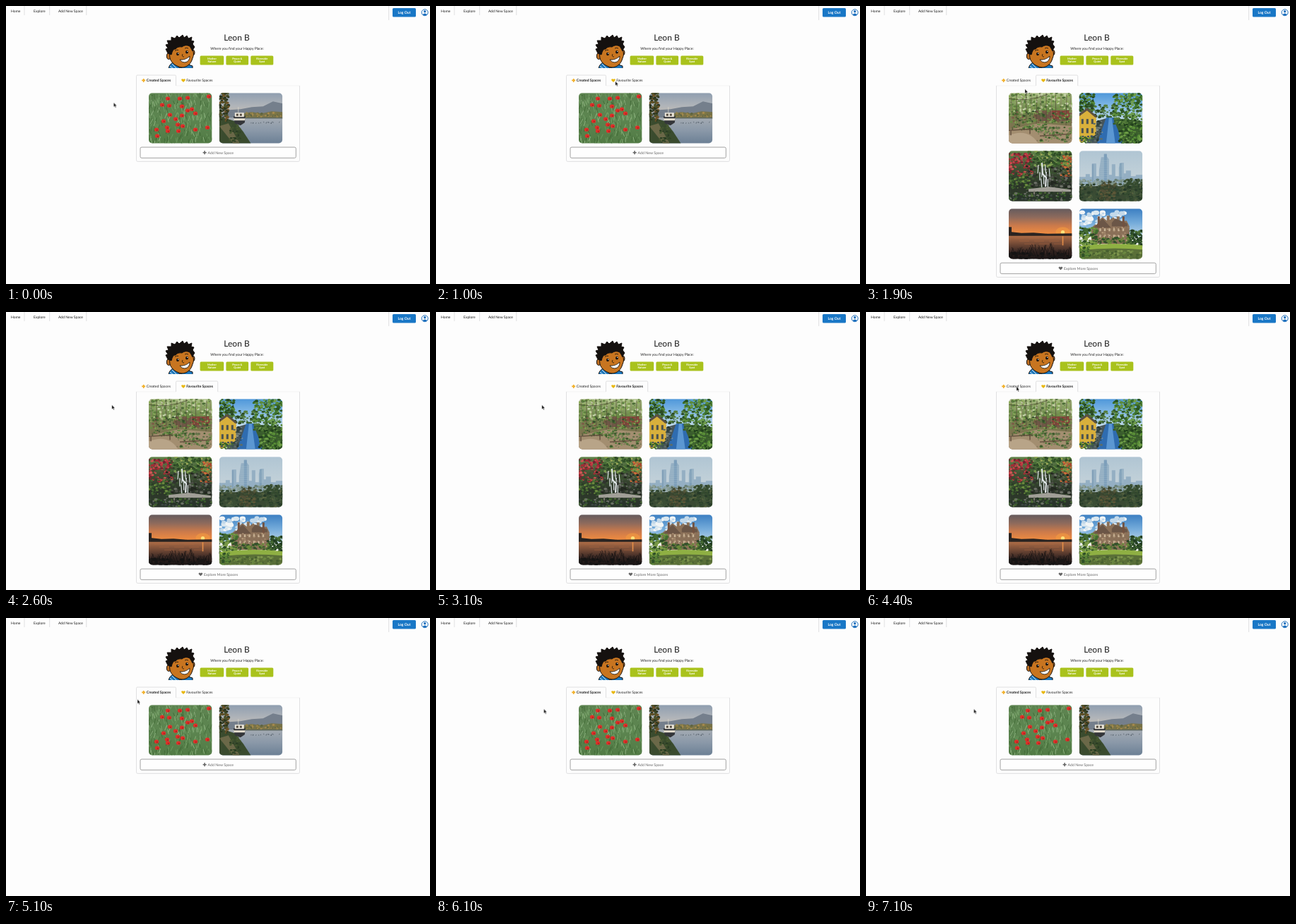
An HTML page for the animation above (7.2 s loop, 600 by 394 pixels).

```html
<!DOCTYPE html>
<html lang="en">
<head>
<meta charset="utf-8">
<title>Happy Place profile</title>
<style>
html, body { margin: 0; width: 100%; height: 100%; overflow: hidden; background: #fdfdfd; }
svg { display: block; width: 100%; height: 100%; }
text { font: 5.05px Lato, sans-serif; fill: #1c1c1c; text-rendering: geometricPrecision; }
.bold { font-weight: 700; }
.mid { text-anchor: middle; }
.white { fill: #fff; }
.name { font-size: 12px; }
.tag { font-size: 3.9px; }
.wide { font-size: 5.25px; fill: #666; }
.rule { fill: none; stroke: #d9d9da; stroke-width: .8; }
.button { fill: #fefefe; stroke: #999; stroke-width: .9; }
</style>
</head>
<body>
<svg viewBox="0 0 600 394">
  <defs>
    <path id="plus" d="M-.8-2.5H.8V-.8H2.5V.8H.8V2.5H-.8V.8H-2.5V-.8H-.8Z"/>
    <path id="heart" d="M0 2.5L-2.5 0C-3.6-1.5-1.6-3.4 0-1.6C1.6-3.4 3.6-1.5 2.5 0Z"/>
    <clipPath id="frame"><rect width="89.3" height="71.3" rx="5"/></clipPath>
    <clipPath id="portrait"><rect x="222" y="38" width="50" height="50"/></clipPath>
  </defs>

  <path class="rule" d="M26 0V13M61.7 0V13M113.8 0V13M541.7 0V20"/>
  <text x="7" y="8.5">Home</text>
  <text x="39" y="8.5">Explore</text>
  <text x="74" y="8.5">Add New Space</text>
  <rect x="547" y="3" width="33" height="12.5" rx="1.5" fill="#1977c6"/>
  <text class="bold mid white" x="563.5" y="11">Log Out</text>
  <g fill="none" stroke="#1f70bd">
    <circle cx="592.7" cy="9.2" r="4.5"/>
    <circle cx="592.7" cy="7.8" r="1.7" fill="#1f70bd" stroke="none"/>
    <path d="M589.4 12.3Q592.7 8.7 596 12.3Q592.7 15 589.4 12.3Z" fill="#1f70bd" stroke="none"/>
  </g>

  <g clip-path="url(#portrait)" stroke="#15110f" stroke-width="1" stroke-linejoin="round">
    <path d="M230 89Q231 82 237 80L246 88 258 83 264 85V89Z" fill="#1e78bd"/>
    <path d="M232 85l5 4M235 82l6 6" stroke="#d5e7f2"/>
    <ellipse cx="230.3" cy="71" rx="2.9" ry="4.4" fill="#c06f20"/>
    <ellipse cx="265" cy="66" rx="2" ry="3.6" fill="#c06f20"/>
    <path d="M231 65C234 56 240 57 246 54C252 51 257 53 260 55C265 61 267 68 264 74C262 82 256 87 249 87C241 86 234 81 232 74Z" fill="#c87520"/>
    <path d="M229 67L226 61 229 60 226 55 230 54 228 49 234 49 234 44 239 46 242 42 245 45 250 41 252 45 256 42 258 46 263 44 262 49 266 50 264 54 267 58 265 61 264 64Q262 60 260 57Q254 54 249 58Q243 57 240 61Q236 60 234 69Z" fill="#15110f"/>
    <path d="M246 76Q254 77 260 71Q260 79 253 80Q248 80 246 76Z" fill="#fff" stroke-width=".8"/>
    <g fill="#15110f" stroke="none">
      <ellipse cx="243" cy="68" rx="1.9" ry="2.3"/>
      <ellipse cx="256" cy="65.2" rx="1.9" ry="2.3"/>
    </g>
    <g fill="#fff" stroke="none">
      <circle cx="243.7" cy="67.2" r=".7"/>
      <circle cx="256.7" cy="64.4" r=".7"/>
    </g>
    <path d="M239 63.5Q241 61.5 244 62.5M253 60Q255 58.5 258 60M250 68Q248 72 252 72" fill="none" stroke-width=".8"/>
  </g>

  <text class="name mid" x="326.5" y="49">Leon B</text>
  <text class="mid" x="327" y="62">Where you find your Happy Place:</text>
  <g id="tags"></g>
  <g id="created"></g>
  <g id="favourite"></g>
  <path id="cursor" d="M0-.3V5.7L1.4 4.6 2.4 6.8 3.4 6.4 2.4 4.3H4.2Z" fill="#111" stroke="#fff" stroke-width=".3"/>
</svg>
<script>
const LOOP = 7200, STEP = 100;
const OPEN_FAVOURITES = 1300, OPEN_CREATED = 4600;
const el = id => document.getElementById(id);

let seed = 41;
const rnd = () => (seed = seed * 16807 % 2147483647) / 2147483647;
const pick = list => list[Math.floor(rnd() * list.length)];
const repeat = (n, fn) => Array.from({ length: n }, fn).join('');

// Drawing helpers; colour lists are space separated.
const box = (x, y, w, h, fill) => `<rect x="${x}" y="${y}" width="${w}" height="${h}" fill="${fill}"/>`;
const shape = (d, fill) => `<path d="${d}" fill="${fill}"/>`;
const line = (d, stroke, width = 1) => `<path d="${d}" fill="none" stroke="${stroke}" stroke-width="${width}"/>`;
const dot = (x, y, r, fill, squash = 1) =>
  `<ellipse cx="${x.toFixed(1)}" cy="${y.toFixed(1)}" rx="${r.toFixed(1)}" ry="${(r * squash).toFixed(1)}" fill="${fill}"/>`;
const leaves = (n, x, y, w, h, r, colours) => repeat(n, () =>
  dot(x + rnd() * w, y + rnd() * h, r * (.5 + rnd()), pick(colours.split(' ')), .75));
const blades = (n, x, y, w, h, len, colours) => repeat(n, () => {
  const lean = (rnd() - .5) * len;
  return line(`M${(x + rnd() * w).toFixed(1)} ${(y + rnd() * h).toFixed(1)}l${lean.toFixed(1)} ${-len}`,
    pick(colours.split(' ')), .7);
});
let fades = 0;
const fade = (y, h, colours) => {
  const id = 'fade' + fades++, list = colours.split(' ');
  const stops = list.map((c, i) => `<stop offset="${i / (list.length - 1)}" stop-color="${c}"/>`).join('');
  return `<linearGradient id="${id}" x2="0" y2="1">${stops}</linearGradient>` + box(0, y, 90, h, `url(#${id})`);
};

const poppies = () => {
  const spots = [[27, 8], [44, 8], [55, 7], [85, 5], [19, 17], [29, 18], [47, 19], [66, 29], [30, 31],
    [47, 32], [55, 25], [61, 23], [21, 40], [41, 45], [48, 47], [26, 49], [11, 52], [27, 54], [42, 54],
    [66, 52], [83, 49], [12, 61], [38, 37]];
  return fade(0, 72, '#5d8350 #5c8550 #527b45') +
    blades(260, 0, 4, 90, 74, 7, '#8db47c #426b38 #6f9c60 #a4c396 #39622f #78a56c') +
    spots.map(([x, y]) => dot(x, y, 3.1, '#de3029', .85) + dot(x + .8, y + .7, 1.1, '#b3211f')).join('');
};

const riverBoat = () => fade(0, 36, '#8f9eb0 #b0b4b9 #cdc2b1') +
  shape('M0 30L14 24 30 23 46 20 62 19 76 12 90 15V36H0Z', '#757f8c') +
  shape('M30 30L45 27 60 29 74 26 90 27V37H30Z', '#77724a') +
  leaves(60, 36, 28, 54, 6, 1.2, '#94834a #5f6440 #a88a4d #74703f') +
  fade(35, 37, '#a4abb3 #8a98a8 #6b7f94') +
  box(34, 35, 56, 1.2, '#525a4b') +
  shape('M0 33L22 40 34 55 45 72H0Z', '#3a4b2e') +
  shape('M0 47L13 43 29 72H20Z', '#6b6848') +
  leaves(110, -1, 0, 14, 40, 1.7, '#30391f #4c5129 #6d5327 #293420') +
  leaves(60, 15, 45, 14, 26, 1.3, '#2a3d23 #46582f #374a29') +
  shape('M20 33L37 33 36 42 30 46 22 43Z', '#34363a') +
  box(22, 28, 13, 6, '#ece7db') + box(24, 29.5, 3, 3, '#544b40') + box(29, 29.5, 3, 3, '#544b40') +
  shape('M20 36L37 36 36 39 21 39Z', '#e5dfd0') + line('M27 28V20', '#ded8ca', .7) +
  blades(16, 40, 42, 45, 2, 1.5, '#45515b');

const woodland = () => fade(0, 72, '#a9bd83 #6c8749 #7d7350 #927c5e') +
  leaves(260, 0, 0, 90, 28, 1.6, '#8fae5d #bdcf98 #5f8340 #7b994d #4a6936 #c9d5ae') +
  box(38, 25, 52, 15, '#6e5746') + box(60, 25, 26, 12, '#86443a') +
  leaves(150, 0, 26, 90, 16, 1.5, '#44682f #668b40 #344f2b #82a653 #7a5b45') +
  repeat(13, (_, i) => line(`M${4 + i * 7} ${40 + i % 3 * 3}l${i % 3 - 1} -43`, i % 2 ? '#544a38' : '#867d62', .7)) +
  shape('M0 52L42 43 90 47V72H0Z', '#a38e70') +
  shape('M0 60Q28 49 42 72H0Z', '#b8a488') +
  leaves(100, 38, 47, 52, 22, 1.5, '#567a3e #70944a #3d5a2c #8a7d60 #65704a') +
  leaves(50, 5, 44, 50, 9, 1.4, '#4d7037 #6d8f48 #384f2b') +
  line('M0 53L34 51M3 53V60M30 51V58M44 61L88 58', '#65523f', 1.5) +
  line('M0 8Q28 13 55 2', '#39352a', .6);

const townCanal = () => fade(0, 40, '#4e97da #86bbe6 #c3dbe9') +
  leaves(240, 48, 1, 44, 38, 1.8, '#396f2b #5b8b3b #28521f #6f9d4b #34592a') +
  leaves(110, -1, 0, 22, 27, 1.7, '#315d27 #568639 #23441e') +
  leaves(70, 14, 17, 34, 18, 1.7, '#3a6030 #547c3d #2a4724') +
  shape('M0 30L11 23 24 33V64L0 72Z', '#d8b03c') +
  shape('M0 29L11 21 25 33 23 35 11 25 0 33Z', '#5a5143') +
  repeat(6, (_, i) => box(3 + i % 3 * 7, i < 3 ? 37 : 50, 3, 7, '#4a5150')) +
  shape('M24 40L38 36 28 72H8L24 58Z', '#47555a') +
  shape('M38 35H49L64 72H25Z', '#2f6cb0') +
  shape('M42 35H46L51 72H38Z', '#5b97d2') +
  shape('M48 36L90 40V72H63Z', '#3a5d2d') +
  leaves(190, 57, 38, 35, 34, 1.6, '#2a4d20 #598f37 #6f9f47 #1f3c1b #41672e') +
  leaves(50, 49, 34, 20, 10, 1.4, '#365d2b #24461f #557c3a') +
  leaves(35, 20, 40, 13, 28, 1.5, '#34453f #5d6d68 #27362f #85908a') +
  leaves(40, 0, 61, 20, 10, 1.4, '#325e29 #638c3d #41515d');

const waterfall = () => fade(0, 72, '#61844a #3f5234 #2b3429 #303f2b') +
  leaves(200, 28, 0, 62, 22, 1.7, '#436b32 #769a4d #315028 #a3ae5a #2a4224') +
  leaves(170, -1, 4, 34, 31, 1.5, '#a72a35 #c03c45 #6e2530 #cc5552 #3c4a2c') +
  leaves(60, 74, 7, 16, 30, 1.5, '#cc6b3b #a94c31 #7a8b3d') +
  leaves(170, 25, 22, 65, 32, 1.7, '#30332f #4b4e46 #6b6f66 #22271f #3b5430') +
  repeat(9, (_, i) => line(`M${42 + i * 1.9} ${20 + i * 7 % 5 * 5}l${i % 3 - 1} 12`, '#d5dde0', 1.2)) +
  line('M47 17L48 33 53 38 52 51', '#e3e9eb', 2) +
  leaves(90, 0, 32, 32, 22, 1.7, '#466932 #6d8d3f #263f22 #35512b') +
  shape('M28 54L57 51 88 55V58H28Z', '#a19f97') + line('M36 57V63M76 57V63', '#77756c', 2) +
  box(0, 62, 90, 10, '#29342a') +
  leaves(110, 0, 59, 90, 12, 1.5, '#375a2b #55733a #233522 #3c4840 #6a6f66');

const skyline = () => fade(0, 72, '#b0c5d3 #bccdd7 #c9d4d9 #a5b5b8') +
  shape('M0 43V37H9V33H15V37H18V18H24V36H28V28L31 9H35V4H39V8L42 12V34H46V19H51V36H56V24L58 17 63 17V32H66V28H73V36H80V34H90V49H0Z', '#94afc3') +
  box(35, 5, 4, 39, '#7d9fba') + box(57, 18, 3, 26, '#7d9eb6') + box(18, 19, 2, 25, '#809fb7') +
  repeat(9, (_, i) => line(`M29 ${14 + i * 3}H42M56 ${20 + i * 2}H63`, '#a9c1d0', .4)) +
  leaves(110, 0, 41, 90, 7, 1.8, '#768c84 #83978c #677f76 #8d9f97') +
  box(0, 50, 90, 22, '#3a4a33') +
  leaves(220, -1, 47, 92, 25, 1.9, '#2f4430 #465a3d #273a28 #59633f #3a4d34') +
  leaves(90, 30, 43, 22, 27, 1.7, '#514f37 #3e4630 #5c5738 #39432c') +
  leaves(120, 64, 40, 26, 30, 1.8, '#263a29 #344a2f #415436');

const sunset = () => fade(0, 36, '#655b5d #8d6a5c #cb7a4b #f08c40') +
  dot(76.5, 33, 10, '#f8a13f77', .7) + dot(76.5, 33.5, 2.7, '#ffe27a') +
  fade(36, 36, '#b9744a #7d5039 #3d2a25 #151213') +
  shape('M0 36V26H4V33L18 34.5 35 34 55 35.5 90 35V38.5H0Z', '#292321') +
  line('M76.5 39V52', '#e58f49', 1.6) +
  repeat(9, (_, i) => line(`M${8 + i * 7} ${42 + i % 3 * 4}h14`, '#a8653f', .5)) +
  blades(110, 0, 62, 90, 12, 8, '#171414 #211a18') +
  blades(10, 38, 66, 40, 6, 18, '#171414') +
  leaves(70, 0, 63, 90, 9, 2, '#141313 #1a1716');

const manor = () => fade(0, 40, '#3c7fc2 #74abda #bed7e8') +
  leaves(60, 2, 4, 62, 18, 3, '#f2f5f6 #dae7ef #c3d9ea') +
  shape('M17 50V27L23 22 27 27V17L33 12 39 17V10H43V16L48 12 53 17V11H57V18L67 17 71 25V50Z', '#8a7058') +
  shape('M20 27L33 14 45 27ZM46 20L51 14 68 21V25H46Z', '#6b5647') +
  box(26, 11, 3, 16, '#725240') + box(61, 11, 3, 15, '#725240') +
  repeat(14, (_, i) => box(22 + i % 7 * 6.5, 28 + Math.floor(i / 7) * 9, 2.4, 4, '#c9b497')) +
  leaves(60, 18, 26, 52, 20, 1, '#a08468 #6b5643 #b59a7b') +
  leaves(150, -1, 27, 26, 27, 1.8, '#426a30 #658c3c #2c4c26 #7c9a48') +
  leaves(130, 68, 31, 22, 23, 1.8, '#2d4e28 #496d35 #223d22') +
  leaves(75, 22, 41, 50, 10, 1.5, '#3f622d #68883a #31502a') +
  shape('M0 53Q45 47 90 52V60H0Z', '#8fb043') +
  shape('M0 59Q46 54 90 58V72H0Z', '#5b7038') +
  leaves(120, 0, 60, 90, 11, 1.6, '#6c8841 #465e2f #7d944c #566d37') +
  leaves(50, 0, 54, 15, 17, 1.6, '#2f5127 #5b8338');

const gallery = photos => photos.map((photo, i) =>
  `<g transform="translate(${i % 2 ? 301.8 : 202} ${123.2 + Math.floor(i / 2) * 82})" clip-path="url(#frame)">${photo()}</g>`).join('');
const icon = (id, x, y, fill) => `<use href="#${id}" x="${x}" y="${y}" fill="${fill}"/>`;

// One tab panel: outline with the open tab, labels, photos and the bottom button.
const panel = ({ from, to, bottom, photos, action, mark, textX }) => {
  const open = from < 200;
  return `<path class="rule" d="M184.5 113V${bottom - 2}q0 2 2 2H413.5q2 0 2-2V113"/>` +
    `<path class="rule" stroke-opacity=".35" d="M184.5 113H${from}M${to} 113H415.5"/>` +
    `<path class="rule" d="M${from} 113V99.5q0-1.5 1.5-1.5H${to - 1.5}q1.5 0 1.5 1.5V113"/>` +
    icon('plus', 194.7, 105.4, '#f2ad22') + icon('heart', 251, 105.6, '#e9b70d') +
    `<text class="${open ? 'bold' : ''}" x="198.8" y="107.2">Created Spaces</text>` +
    `<text class="${open ? '' : 'bold'}" x="255.3" y="107.2">Favourite Spaces</text>` +
    gallery(photos) +
    `<rect class="button" x="190" y="${bottom - 20.3}" width="220.3" height="15.3" rx="2"/>` +
    icon(mark, textX - 4.5, bottom - 12.6, '#666') +
    `<text class="wide" x="${textX}" y="${bottom - 10.7}">${action}</text>`;
};

el('created').innerHTML = panel({ from: 184.5, to: 240.5, bottom: 220.4, photos: [poppies, riverBoat],
  action: 'Add New Space', mark: 'plus', textX: 285.6 });
el('favourite').innerHTML = panel({ from: 240.5, to: 299.7, bottom: 384.4,
  photos: [woodland, townCanal, waterfall, skyline, sunset, manor],
  action: 'Explore More Spaces', mark: 'heart', textX: 279.9 });
el('tags').innerHTML = [[274.6, 33.6, 'Mother', 'Nature'], [311.4, 31.7, 'Peace &amp;', 'Quiet'], [346.3, 32, 'Riverside', 'Spot']]
  .map(([x, w, a, b]) => `<rect x="${x}" y="70.4" width="${w}" height="13.2" rx="1.5" fill="#a9c21c"/>` +
    [a, b].map((word, i) => `<text class="tag bold mid white" x="${x + w / 2}" y="${76.2 + i * 4.2}">${word}</text>`).join(''))
  .join('');

// Pointer path: time, x, y, easing towards the next stop.
const path = [
  [0, 152.4, 137.2], [300, 152.4, 137.2, 'ease-in-out'], [900, 253, 107], [1000, 253.7, 106.9],
  [1400, 253.7, 106.9, 'ease-in'], [1900, 224.9, 118, 'ease-out'], [2500, 149.8, 132], [3300, 149.8, 132, 'ease-in'],
  [3600, 167, 127.7, 'ease-out'], [4200, 213, 106], [4700, 213, 106, 'ease-in'], [5100, 186, 115.6, 'ease-out'],
  [5700, 152.6, 129.2], [LOOP, 152.6, 129.2]
];
const pointer = el('cursor').animate(path.map(([t, x, y, easing = 'linear']) =>
  ({ offset: t / LOOP, transform: `translate(${x}px, ${y}px)`, easing })), { duration: LOOP, fill: 'both' });
pointer.pause();

function draw() {
  const t = Math.floor(performance.now() % LOOP / STEP) * STEP;
  const favourites = t >= OPEN_FAVOURITES && t < OPEN_CREATED;
  pointer.currentTime = t;
  el('created').style.display = favourites ? 'none' : '';
  el('favourite').style.display = favourites ? '' : 'none';
  requestAnimationFrame(draw);
}
draw();
</script>
</body>
</html>
```
